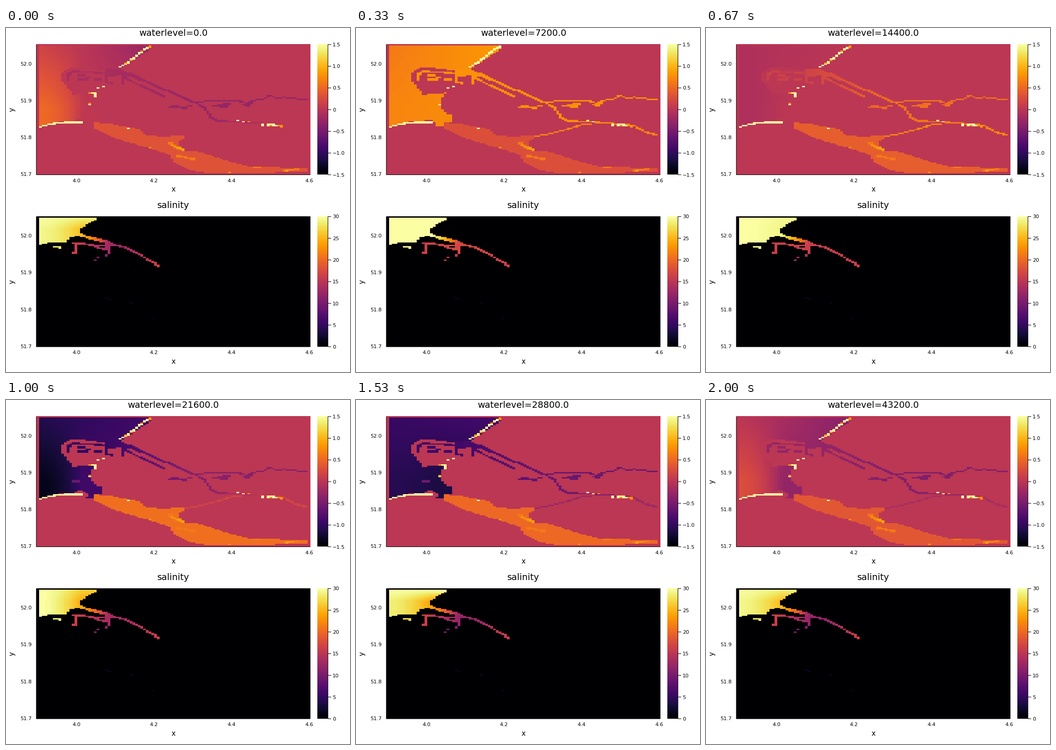
A matplotlib script for the animation above (2330 ms loop, 748x749 px).

```python
import numpy as np
import matplotlib.pyplot as plt
from matplotlib.animation import FuncAnimation
from matplotlib.collections import LineCollection
from matplotlib.path import Path

plt.rcParams["font.family"] = "DejaVu Sans"

W, H, DPI = 748, 749, 100
LEFT, RIGHT, TOP, HIGH = 66, 662, 36, 283.5
DROP = H / 2                        # lower panel offset
N = 100
CW, CH = (RIGHT - LEFT) / N, HIGH / N
X, Y = np.meshgrid(LEFT + CW * (np.arange(N) + .5), TOP + CH * (np.arange(N) + .5))
CENTRES = np.column_stack([X.ravel(), Y.ravel()])
STEP_ENDS = [330, 670, 1000, 1330, 1670, 2000, 2330]
TICK_MS = 10
inferno = plt.get_cmap("inferno")


# ---- cell masks, all from points in pixels ----
def area(*pts):
    return Path(pts).contains_points(CENTRES).reshape(N, N)


def between(top, bottom):
    """Cells between two edges, each a few (x, y) points."""
    (xt, yt), (xb, yb) = zip(*top), zip(*bottom)
    inside = (X > xt[0]) & (X < xt[-1])
    return inside & (Y > np.interp(X, xt, yt)) & (Y < np.interp(X, xb, yb))


def stroke(r, *pts):
    """Cells closer than r cell units to a polyline."""
    mask = np.zeros((N, N), bool)
    for (x0, y0), (x1, y1) in zip(pts, pts[1:]):
        dx, dy = (x1 - x0) / CW, (y1 - y0) / CH
        px, py = (X - x0) / CW, (Y - y0) / CH
        t = np.clip((px * dx + py * dy) / (dx * dx + dy * dy), 0, 1)
        mask |= np.hypot(px - t * dx, py - t * dy) < r
    return mask


def cells(*pts):
    mask = np.zeros((N, N), bool)
    for x, y in pts:
        mask[int((y - TOP) / CH), int((x - LEFT) / CW)] = True
    return mask


def spurs(seed, n, pts, reach):
    """Small random basins up to reach rows below a polyline."""
    rng = np.random.default_rng(seed)
    xs, ys = zip(*pts)
    mask = np.zeros((N, N), bool)
    for x in rng.uniform(xs[0], xs[-1], n):
        col = int((x - LEFT) / CW)
        row = int((np.interp(x, xs, ys) - TOP) / CH) + rng.integers(0, reach + 1)
        mask[row:row + rng.integers(1, 3), col:col + rng.integers(1, 4)] = True
    return mask


def down(*pts):
    """Lower panel points, moved to the grid of the upper one."""
    return [(x, y - DROP) for x, y in pts]


# ---- water level geography ----
sea = area((71, 38), (317, 38), (317, 46), (246, 91), (216, 94), (168, 88), (138, 87),
           (120, 99), (120, 114), (138, 136), (146, 146), (197, 142), (186, 154),
           (186, 175), (198, 188), (208, 191), (208, 204), (192, 215), (174, 215),
           (168, 200), (112, 205), (72, 217))
harbour = stroke(.8, (134, 114), (136, 102), (145, 96), (185, 97), (216, 100))
harbour |= spurs(6, 8, [(138, 103), (195, 105)], 3)
mouth = between([(213, 91), (246, 90), (282, 103), (330, 126)],
                [(213, 108), (250, 104), (275, 108), (330, 131)])
fairway = mouth | stroke(.7, (325, 128), (355, 139), (385, 152), (411, 163))
fairway |= stroke(.6, (219, 104), (219, 120), (230, 121))
fairway |= stroke(.6, (253, 122), (253, 106), (280, 121), (318, 137), (345, 151))
north_path = [(411, 162), (440, 160), (500, 158), (525, 165), (536, 159), (560, 155),
              (575, 147), (590, 154), (606, 152), (656, 158)]
north_river = stroke(.5, *north_path)
north_river |= spurs(8, 11, [(441, 164), (535, 164)], 2)
north_river |= spurs(3, 6, [(348, 170), (410, 170)], 2)
south_path = [(411, 163), (430, 174), (447, 195), (460, 203), (500, 204), (580, 211),
              (606, 213), (630, 228), (656, 234)]
south_river = stroke(.6, *south_path)
link = stroke(.5, (372, 238), (411, 233), (460, 221), (495, 210), (512, 209))
lagoon = between([(190, 207), (220, 208), (237, 212), (290, 220), (304, 233), (358, 239),
                  (370, 250), (388, 267), (412, 268), (470, 286), (520, 301), (656, 306)],
                 [(190, 218), (245, 243), (300, 259), (358, 277), (364, 292), (395, 309),
                  (440, 317), (560, 316), (656, 313)])
lagoon |= area((356, 235), (388, 235), (386, 241), (370, 254), (356, 250))
shoal = stroke(.9, (356, 250), (372, 262)) | stroke(.8, (376, 280), (410, 286))
shoal |= stroke(.7, (605, 311), (636, 308)) | stroke(.5, (538, 303), (554, 303))
crest = stroke(.6, (359, 255), (372, 261), (386, 266)) | stroke(.6, (612, 311), (624, 310))
dam = stroke(.55, (74, 216), (96, 210), (125, 206), (165, 206))
dam |= stroke(.9, (140, 205), (162, 205))
dam_end = stroke(.9, (158, 200), (171, 204), (171, 212))
flat = stroke(.9, (147, 177), (158, 177))
barrier = stroke(.55, (313, 41), (304, 46), (275, 68), (249, 86))
locks = cells((183, 165), (183, 168), (266, 219), (313, 262), (487, 316), (201, 130),
              (212, 128), (504, 202), (516, 205), (525, 206))
locks |= spurs(2, 5, [(555, 210), (608, 215)], 0)
quay = stroke(.6, (183, 142), (194, 142), (194, 151))
glow = np.where(np.random.default_rng(4).random((N, N)) < .75, 1.5, .8)

# levels by place at each two-hour step
NORTHWEST = [.17, .62, -.1, -1.1, -.97, -1, 0]
NORTHEAST = [-.27, .83, 0, -.9, -.88, -1.05, -.38]
SOUTHWEST = [.5, .7, -.1, -1.36, -1.08, -1.05, .27]
BAY = [.03, .73, 0, -.9, -1.15, -1.1, -.3]
FAIRWAY = [-.13, .78, .15, -1, -.92, -1.03, -.27]
RIVER = [-.29, .77, .55, -.38, -.6, -.55, -.43]
EAST = [0, .68, .7, .2, -.25, -.22, -.15]
LAGOON = [.32, .29, .42, .55, .5, .41, .36]


def mix(a, b, t):
    return a + (b - a) * np.clip(t, 0, 1)


def water(k):
    f = np.zeros((N, N))

    def put(mask, val):
        f[mask] = np.broadcast_to(val, f.shape)[mask]

    u = (X - 72) / 95
    north = mix(NORTHWEST[k], NORTHEAST[k], (X - 72) / 240)
    south = mix(SOUTHWEST[k], BAY[k], np.clip(u, 0, 1) ** 2)
    put(sea, mix(north, south, (Y - 40) / 135))
    along = mix(FAIRWAY[k], RIVER[k], (X - 215) / 196)
    put(harbour | fairway | north_river, along)
    put(south_river, mix(RIVER[k], EAST[k], (X - 430) / 180))
    put(link, EAST[k])
    put(lagoon, LAGOON[k])
    put(shoal, .62)
    put(crest, .9)
    flood = NORTHWEST[k] > .5
    if not flood:
        put(dam_end & sea, 0)
        put(quay, glow)
    if NORTHWEST[k] < -.5:
        put(flat, -.6)
    put(dam, 1.5)
    put(barrier, 1.5 if flood else glow)
    put(locks, glow)
    return (f + 1.5) / 3


# ---- salinity geography ----
ocean = area(*down((71, 413), (198, 413), (198, 417), (161, 437), (161, 452), (138, 457),
                   (131, 468), (107, 466), (96, 467), (84, 470), (72, 474)))
ocean |= stroke(.6, *down((104, 477), (117, 477), (117, 479)))
plume = stroke(1, *down((158, 449), (175, 455), (197, 461), (222, 467)))
plume |= stroke(.6, *down((222, 468), (258, 478), (285, 490), (300, 499), (330, 516)))
plume |= stroke(.8, *down((325, 515), (330, 519)))
basins = stroke(.8, *down((146, 469), (165, 470), (190, 474), (222, 474), (240, 475)))
basins |= stroke(.6, *down((153, 470), (153, 490), (146, 490)))
basins |= stroke(.8, *down((194, 477), (212, 481))) | stroke(.9, *down((222, 468), (224, 491)))
ponds = cells(*down((218, 495), (218, 498), (200, 500), (194, 505)))
traces = cells(*down((218, 587), (224, 590), (271, 599), (319, 632)))

OFFSHORE = [29.2, 30, 30, 30, 28.6, 27.8, 29.2]
ESTUARY = [25.5, 30, 29, 24.2, 23.8, 23.5, 25.2]
JUNCTION = [13, 17, 16, 13.3, 12.2, 11.7, 12.2]
HEAD = 16.2


def salt(k):
    f = np.zeros((N, N))
    far, near, mid = OFFSHORE[k], ESTUARY[k], JUNCTION[k]
    open_sea = mix(far, near, np.clip((X - 72) / 93, 0, 1) ** 1.7)
    open_sea = mix(open_sea, 30, (438 - DROP - Y) / 18 * min(1, .3 + (30 - far) / 3))
    channel = np.interp(X, [165, 200, 222, 260, 330], [near, .45 * near + .55 * mid + 1, mid, mid, HEAD])
    f[basins] = mix(HEAD, mid, (X - 150) / 72)[basins]
    f[plume] = channel[plume]
    f[ocean] = open_sea[ocean]
    f[ponds] = mid - 2
    f[traces] = 1.8
    return f / 30


def paint(field):
    return inferno(np.clip(field, 0, 1), bytes=True)


STEPS = range(len(STEP_ENDS))
level_imgs = [paint(water(k)) for k in STEPS]
salt_imgs = [paint(salt(k)) for k in STEPS]

# ---- figure ----
fig = plt.figure(figsize=(W / DPI, H / DPI), dpi=DPI, facecolor="white")
ax = fig.add_axes([0, 0, 1, 1])
ax.axis("off")
ramp = paint(np.linspace(1, 0, 256)[:, None])
lines = []


def show(img, x0, x1, y0):
    return ax.imshow(img, extent=(x0, x1, y0 + HIGH, y0), aspect="auto",
                     interpolation="nearest", origin="upper")


def label(x, y, s, size=8, ha="center", va="baseline", **kw):
    return ax.text(x, y, s, fontsize=size, ha=ha, va=va, **kw)


def panel(img, y0, bar_labels):
    art = show(img, LEFT, RIGHT, y0)
    show(ramp, 677, 700, y0)
    base = y0 + HIGH
    lines.append([(LEFT, y0), (LEFT, base), (RIGHT, base)])
    lines.append([(700, y0), (700, base)])
    for i, s in enumerate(bar_labels):
        y = base - HIGH * i / (len(bar_labels) - 1)
        lines.append([(700, y), (707, y)])
        label(710, y + 4, s, ha="left")
    for i in range(4):
        label(55.5, base + 3 - 80.3 * i, f"{51.7 + .1 * i:.1f}", ha="right")
        label(153 + 168.7 * i, base + 16.5, f"{4 + .2 * i:.1f}")
    label(364, base + 37, "x", 11)
    label(13, y0 + HIGH / 2, "y", 11, va="center", rotation=90)
    return art


level_art = panel(level_imgs[0], TOP, [f"{v / 2:.1f}".replace("-", "\u2212") if v else "0"
                                       for v in range(-3, 4)])
salt_art = panel(salt_imgs[0], TOP + DROP, [str(5 * i) for i in range(7)])
ax.add_collection(LineCollection(lines, colors="black", linewidths=.8, snap=False))
title = label(364, 17, "", 14)
label(364, 17 + DROP, "salinity", 14)
ax.set_xlim(0, W)
ax.set_ylim(H, 0)


def update(i):
    k = int(np.searchsorted(STEP_ENDS, i * TICK_MS, side="right"))
    title.set_text(f"waterlevel={7200 * k:.1f}")
    level_art.set_data(level_imgs[k])
    salt_art.set_data(salt_imgs[k])
    return title, level_art, salt_art


anim = FuncAnimation(fig, update, frames=STEP_ENDS[-1] // TICK_MS, interval=TICK_MS,
                     init_func=lambda: update(0), repeat=True, repeat_delay=0)
plt.show()
```
